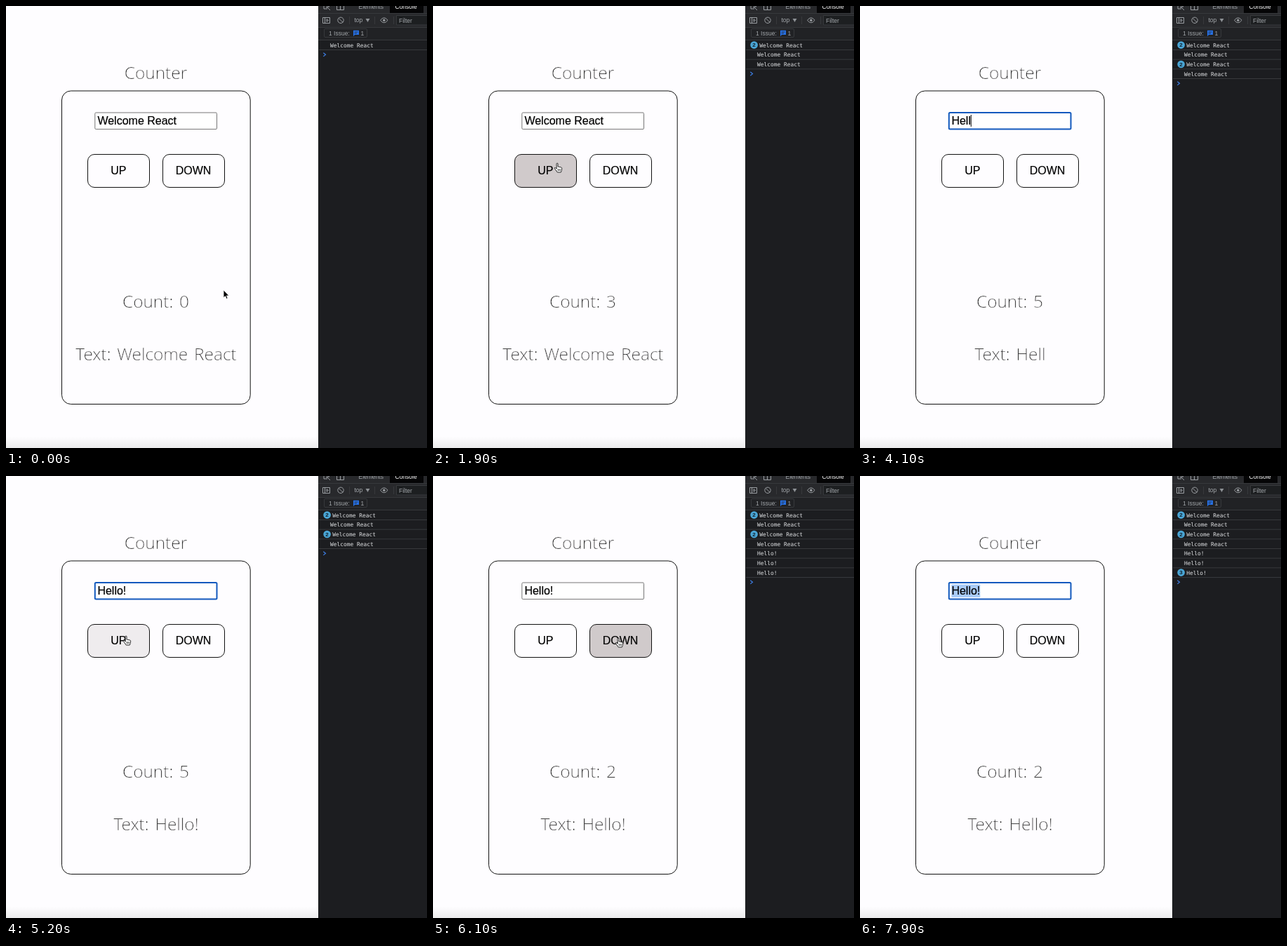
These frames come from a looping animation (600 by 630 pixels, 8 s). An HTML page:

```html
<!DOCTYPE html>
<html lang="en">
<head>
<meta charset="utf-8">
<title>Counter</title>
<style>
  html, body { margin: 0; width: 100%; height: 100%; overflow: hidden; background: #fefdff; }
  svg { display: block; }
  /* the page-coloured outline slims the strokes */
  .light {
    font: 300 24.4px "Open Sans", "Noto Sans", sans-serif;
    word-spacing: 2.5px; text-anchor: middle;
    fill: #111; stroke: #fefdff; stroke-width: .4px;
  }
  .ui { font: 16px "Liberation Sans", Arial, sans-serif; stroke: #000; stroke-width: .2px; }
  .mid { text-anchor: middle; }
  .tool { font: 8.5px "Liberation Sans", Arial, sans-serif; fill: #a4a8ac; }
  .log { font: 7.9px "DejaVu Sans Mono", monospace; fill: #e0e2e4; }
  .badge { font: bold 8px "Liberation Sans", Arial, sans-serif; fill: #10202c; }
  .box { fill: none; stroke: #111; }
  .icon { fill: none; stroke: #9a9ea2; }
  .line { stroke: #37393c; }
  .cursor { stroke-linejoin: round; stroke-linecap: round; }
</style>
</head>
<body>
<svg width="600" height="630" viewBox="0 0 600 630">
  <defs>
    <linearGradient id="fade" x2="0" y2="1">
      <stop stop-color="#fefdff"/>
      <stop offset="1" stop-color="#ececed"/>
    </linearGradient>
  </defs>
  <rect width="600" height="630" fill="#fefdff"/>
  <rect y="614" width="445" height="16" fill="url(#fade)"/>

  <text class="light" x="213.5" y="103.5">Counter</text>
  <rect class="box" x="79.5" y="121" width="268.7" height="446.5" rx="13"/>

  <rect id="field" x="126.8" y="152" width="173.7" height="23.6" rx="1.5" fill="#fff"/>
  <rect id="selection" y="154.5" height="18.5" fill="#a9cbf7"/>
  <text class="ui" id="value" x="130.4" y="169"></text>
  <path id="caret" stroke="#000" d="M0 155v17"/>

  <rect class="box" id="up" x="116.5" y="211.5" width="88" height="47" rx="9.5"/>
  <rect class="box" id="down" x="223.5" y="211.5" width="88" height="47" rx="9.5"/>
  <text class="ui mid" x="160.3" y="240.3">UP</text>
  <text class="ui mid" x="267" y="240.3">DOWN</text>

  <text class="light" id="count" x="213.5" y="429.5"></text>
  <text class="light" id="text" x="214" y="505"></text>

  <rect x="445" width="155" height="630" fill="#1c1d20"/>
  <rect x="445" width="155" height="30" fill="#28292c"/>
  <rect x="445" y="30" width="155" height="18" fill="#212225"/>
  <rect x="547" width="48" height="10" fill="#050506"/>
  <path class="line" d="M445 10.5H600M445 30.5H600M445 48.5H600M489.5 15v11M525.5 15v11M552.5 15v11"/>
  <text class="tool" x="502.5" y="4.3">Elements</text>
  <text class="tool" x="554.5" y="4.3" style="fill:#fff">Console</text>
  <g class="icon">
    <path d="M453 -2V4H456M460 -2V1M457 1L462 6M457 1V5M457 1H461"/>
    <path d="M471.5 -3V5.5H481.5V-3M476.5 -2V5.5"/>
    <path d="M451.5 16.5h10v8h-10zM454.5 16.5v8M457 18.7v3.6l2.5-1.8z"/>
    <circle cx="477" cy="20.3" r="4.2"/>
    <path d="M474 17.3L480 23.3M533.5 20.3q5.3-7 10.6 0q-5.3 7-10.6 0z"/>
    <circle cx="538.8" cy="20.3" r="1.3" fill="#9a9ea2"/>
  </g>
  <text class="tool" x="496.5" y="23">top</text>
  <path fill="#8d9195" d="M512.5 18h6l-3 5z"/>
  <path d="M600 13.5H556.5V27H600" fill="#1d1f21" class="line"/>
  <text class="tool" x="560" y="23.5">Filter</text>
  <rect x="453.5" y="32.5" width="61" height="12" rx="1.5" fill="none" class="line"/>
  <text class="tool" x="460" y="41.5">1 Issue:</text>
  <path fill="#2671e8" d="M495 34.8h8v6.2h-6l-2 2.2z"/>
  <path stroke="#28292c" stroke-width=".8" d="M496.5 37h5M496.5 39h3.5"/>
  <text class="tool" x="505.5" y="41.5">1</text>
  <g id="rows"></g>
  <path id="prompt" fill="none" stroke="#3d7fe6" stroke-width="1.2" d="M452.3 -2.6L455.5 0L452.3 2.6"/>

  <g id="arrow" class="cursor">
    <path fill="#000" stroke="#fff" stroke-width=".8" d="M0 0V10.8L2.5 8.6L4.2 12.4L6 11.6L4.4 7.9H7.6Z"/>
  </g>
  <g id="beam" class="cursor" fill="none">
    <path stroke="#222" d="M-2.5 -5.6Q0 -5.6 0 -4V4Q0 5.6 -2.5 5.6M2.5 -5.6Q0 -5.6 0 -4M0 4Q0 5.6 2.5 5.6M-1.3 1.5H1.3"/>
  </g>
  <g id="hand" class="cursor">
    <path fill="#fff" stroke="#111" stroke-width=".9" d="M-1 1a1 1 0 0 1 2 0v4l1.5 .3 1.5 .3 1.8 .5q1 .3 .9 1.3l-.5 3q-.2 1.6-1 2.6h-5l-2-3-2-2.5q-.3-1.2 1-1l1.8 1.2z"/>
    <path fill="none" stroke="#111" stroke-width=".7" d="M1 8.5v2.3M2.7 8.5v2.3M4.3 8.5v2.3"/>
  </g>
</svg>
<script>
const LOOP = 8000, STEP = 100, FADE = 300;
const ROW_Y = 55.6, ROW_H = 13.67, TEXT_X = 130.4;

// time, x, y of the pointer's hot spot
const path = [
  [0, 310, 405], [400, 285, 350], [700, 202, 254], [900, 177, 224], [2300, 177, 224],
  [2400, 196, 208], [2600, 250, 170], [2800, 264, 162], [2900, 264, 162], [3000, 150, 164],
  [3100, 35, 165], [4700, 35, 165], [4800, 85, 172], [5000, 132, 204], [5200, 171, 228],
  [5300, 196, 232], [5400, 228, 232], [5600, 264, 231], [6300, 264, 231], [6600, 197, 230],
  [6700, 176, 228], [6800, 176, 228], [7000, 184, 204], [7200, 215, 163], [7300, 215, 163],
  [7500, 64, 170], [8000, 64, 170]
];
// time, console row, counter value
const clicks = [
  [0, 0, 0], [1200, 0, 1], [1500, 1, 2], [1800, 2, 3], [2100, 2, 4], [2300, 3, 5],
  [5700, 4, 4], [5900, 5, 3], [6100, 6, 2], [6300, 6, 1], [6800, 6, 2]
];
const typed = [
  [0, "Welcome React"], [3600, "H"], [3800, "He"], [4000, "Hel"],
  [4100, "Hell"], [4200, "Hello"], [4400, "Hello!"]
];
const hovers = {
  up: [[700, 2400], [5100, 5300], [6600, 6900]],
  down: [[5350, 6400]]
};
const focused = [[2900, 5700], [7300, LOOP]];
const selecting = [[2900, 3600], [7300, LOOP]];
const hidden = [[3600, 4800], [7600, LOOP]];

const $ = id => document.getElementById(id);
const within = (spans, t) => spans.some(([a, b]) => t >= a && t < b);
const last = (list, t) => list.filter(e => e[0] <= t).pop();
const show = (el, on) => el.setAttribute("visibility", on ? "visible" : "hidden");
const set = (el, attrs) => { for (const k in attrs) el.setAttribute(k, attrs[k]); };
const rowY = i => ROW_Y + i * ROW_H;

const pen = document.createElement("canvas").getContext("2d");
pen.font = '16px "Liberation Sans", Arial, sans-serif';
const widthOf = s => pen.measureText(s).width;

const rows = Array.from({ length: 7 }, (_, i) => {
  const g = document.createElementNS("http://www.w3.org/2000/svg", "g");
  g.innerHTML = `<path class="line" d="M446 6.9H600"/>
    <g><circle cx="457.6" r="5.3" fill="#4aa6d6"/>
    <text class="badge mid" x="457.6" y="2.8"></text></g>
    <text class="log" y="2.9">${i < 4 ? "Welcome React" : "Hello!"}</text>`;
  g.setAttribute("transform", `translate(0 ${rowY(i)})`);
  $("rows").append(g);
  const [, badge, label] = g.children;
  return { g, badge, label };
});

function pointerAt(t) {
  const i = path.findIndex(p => p[0] > t);
  const [a, b] = [path[i - 1], path[i]];
  const k = (t - a[0]) / (b[0] - a[0]);
  return [a[1] + (b[1] - a[1]) * k, a[2] + (b[2] - a[2]) * k];
}

function hoverLevel(spans, t) {
  return Math.max(0, ...spans.map(([a, b]) => {
    const peak = Math.min(1, (b - a) / FADE);
    return Math.min(peak, (t - a) / FADE, peak - (t - b) / FADE);
  }));
}

function drawPointer(t, x, y) {
  const inside = (l, top, r, bottom) => x > l && x < r && y > top && y < bottom;
  let kind = "arrow";
  if (within(selecting, t) || inside(127, 152, 301, 176)) kind = "beam";
  else if (inside(116, 211, 205, 258) || inside(223, 211, 312, 258)) kind = "hand";
  for (const id of ["arrow", "beam", "hand"]) {
    show($(id), id === kind && !within(hidden, t));
    set($(id), { transform: `translate(${x} ${y})` });
  }
}

function drawField(t, x) {
  const [since, value] = last(typed, t);
  const focus = within(focused, t), select = within(selecting, t);
  const end = TEXT_X + widthOf(value);
  // the selection starts at the character under the pointer
  let from = 0;
  while (from < value.length && TEXT_X + widthOf(value.slice(0, from + 1)) < x) from++;
  const start = TEXT_X + widthOf(value.slice(0, from));

  $("value").textContent = value;
  $("text").textContent = "Text: " + value;
  set($("field"), { stroke: focus ? "#1259bd" : "#767676", "stroke-width": focus ? 2 : 1 });
  set($("selection"), { x: start, width: Math.max(0, end - start) });
  show($("selection"), select);
  set($("caret"), { transform: `translate(${end + 0.3} 0)` });
  show($("caret"), focus && !select && (t - since) % 1000 < 500);
}

function drawConsole(t) {
  const done = clicks.filter(c => c[0] <= t);
  const top = done[done.length - 1];
  $("count").textContent = "Count: " + top[2];
  rows.forEach(({ g, badge, label }, i) => {
    const n = done.filter(c => c[1] === i).length;
    g.style.display = n ? "" : "none";
    badge.style.display = n > 1 ? "" : "none";
    badge.lastElementChild.textContent = n;
    label.setAttribute("x", n > 1 ? 465.3 : 462);
  });
  set($("prompt"), { transform: `translate(0 ${rowY(top[1] + 1)})` });
}

function draw(now) {
  const t = Math.floor((now % LOOP) / STEP) * STEP;
  const [x, y] = pointerAt(t);
  for (const id in hovers) {
    const k = hoverLevel(hovers[id], t);
    const mix = (a, b) => Math.round(a + (b - a) * k);
    $(id).style.fill = `rgb(${mix(254, 208)},${mix(253, 202)},${mix(255, 203)})`;
  }
  drawField(t, x);
  drawConsole(t);
  drawPointer(t, x, y);
}

const begin = performance.now();
function tick() {
  draw(performance.now() - begin);
  requestAnimationFrame(tick);
}
tick();
</script>
</body>
</html>
```
